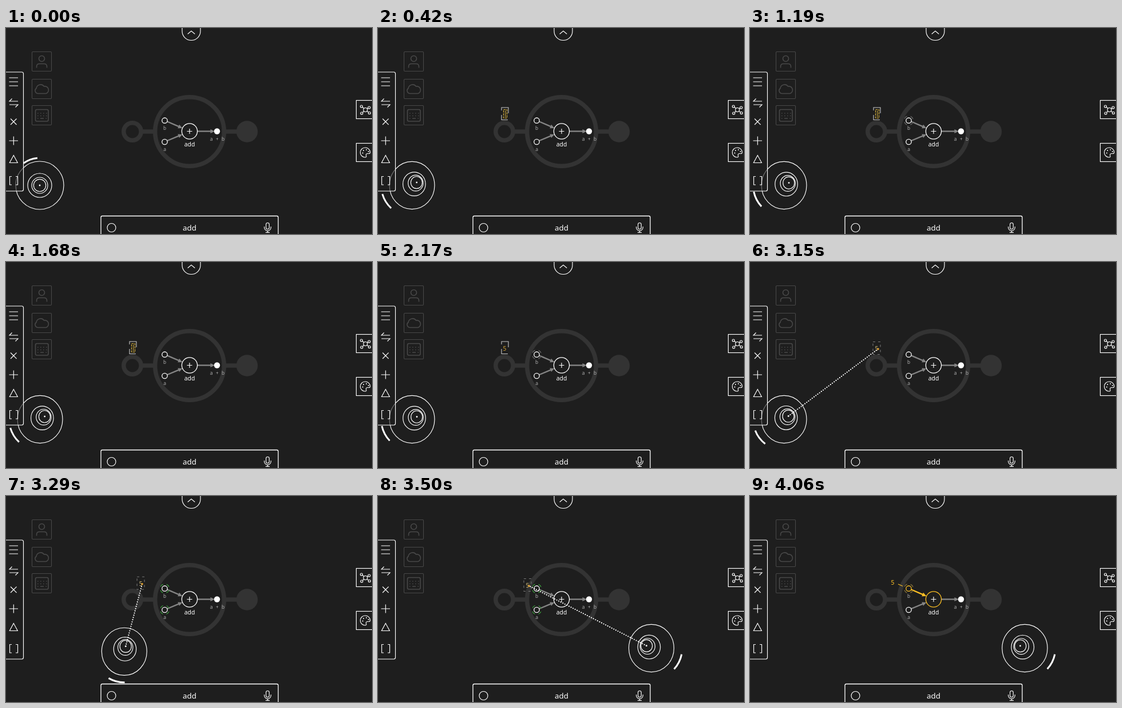
An HTML page that plays this animation: 640 px wide and 360 px high, repeating every 4130 ms.

```html
<!DOCTYPE html>
<html lang="en">
<head>
<meta charset="utf-8">
<title>Add node</title>
<style>
html, body { margin: 0; width: 100%; height: 100%; overflow: hidden; background: #1e1e1e; }
svg { display: block; width: 100vw; height: 100vh; }
text { font-family: "Noto Sans", sans-serif; text-anchor: middle; fill: #fff; }
.mono { font-family: "Noto Sans Mono", monospace; font-size: 8.6px; fill: #aaa; }
.line { fill: none; stroke: #fff; stroke-width: 1.15; }
.dim { fill: none; stroke: #484848; stroke-width: 1.1; }
.node { fill: #1e1e1e; stroke: #fff; stroke-width: 1.3; }
.wire { stroke: #858585; fill: #858585; stroke-width: 2.4; }
.wire path { stroke: none; }
.ring { fill: none; stroke-width: 1.2; stroke-dasharray: 6.5 6.07; }
.hot.node, .hot.wire { stroke: #fbbf24; }
.hot.wire { fill: #fbbf24; }
</style>
</head>
<body>
<svg viewBox="0 0 640 360">
  <rect width="640" height="360" fill="#1e1e1e"/>

  <g fill="none" stroke="#333" stroke-width="7.5">
    <circle cx="321" cy="181" r="60.3"/>
    <circle cx="221" cy="181" r="15.2"/>
    <path d="M239 181H258M384 181H404"/>
    <circle cx="421.5" cy="181" r="18.7" fill="#333" stroke="none"/>
  </g>

  <g class="dim">
    <rect x="45.5" y="41.5" width="34" height="34" rx="1.5"/>
    <rect x="45.5" y="89.5" width="34" height="34" rx="1.5"/>
    <rect x="45.5" y="135.5" width="34" height="34" rx="1.5"/>
    <g stroke-width="1.6">
      <circle cx="62.5" cy="53.5" r="5"/>
      <path d="M53.5 69.5v-2q0-5 5-5h8q5 0 5 5v2"/>
      <path d="M56 114.5a5 5 0 0 1-3-9a7.5 7.5 0 0 1 13.5-3.5a6.5 6.5 0 0 1 3.5 12.5z"/>
      <rect x="51.5" y="142.5" width="22.5" height="20.5" rx="2.5"/>
      <path d="M55 149H72M55 153.5H72" stroke-dasharray="1.5 3.5"/>
      <path d="M55 158h1.5M60 158h6M69.5 158h1.5"/>
    </g>
  </g>

  <g class="line">
    <path d="M308 -2V5.5a16 16 0 0 0 32 0V-2M317.700 10.500L324 5.300L330.300 10.500"/>

    <rect x="612.500" y="126.500" width="40" height="32"/>
    <rect x="612.500" y="201.500" width="40" height="32"/>
    <circle cx="628.500" cy="143" r="3.500"/>
    <circle cx="621.500" cy="137" r="2"/>
    <circle cx="635" cy="139" r="2"/>
    <circle cx="622" cy="149" r="2"/>
    <circle cx="635.500" cy="148.500" r="2"/>
    <path d="M623 138.300L626 140.500M633.200 140L631.500 141.200M623.500 147.500L626 145.500M634 147.200L631 145.300"/>
    <path d="M628 209a8.500 8.500 0 1 0 0 17c2 0 2.500-1.500 1.800-3c-.8-2 .2-3.500 2.500-3.500h2.500c1.500 0 2-1 2-2.500c0-4.500-4-8-8.800-8z"/>
    <path d="M623 218.500h1.500M624.500 214h1.500M629.500 212.800h1.500M633 216h1.500" stroke-width="2"/>

    <path d="M166 362V331q0-2.500 2.500-2.500H473.500q2.500 0 2.500 2.500V362" stroke-width="1.300"/>
    <circle cx="184.500" cy="349" r="7.500"/>
    <rect x="454.700" y="340.500" width="5.600" height="11" rx="2.800"/>
    <path d="M451.700 347v1.500a5.800 5.800 0 0 0 11.600 0v-1.500M457.500 354.300v3M454 357.300h7"/>
  </g>
  <text x="321" y="353.700" font-size="13.400">add</text>

  <g class="wire" id="wireB"><line x1="282" y1="163.500" x2="302" y2="172.200"/><path d="M308.500 175L300.300 175.300L303 168.800Z"/></g>
  <g class="wire"><line x1="282" y1="197" x2="302" y2="188.600"/><path d="M308.500 186L303 192L300.300 185.500Z"/></g>
  <g class="wire"><line x1="335" y1="180.500" x2="358" y2="180.500"/><path d="M365 180.500L357.500 184V177Z"/></g>
  <circle class="node" id="nodeB" cx="277.500" cy="161.700" r="4.700"/>
  <circle class="node" cx="277.500" cy="199" r="4.700"/>
  <circle class="node" id="nodeAdd" cx="321" cy="180.500" r="13.600"/>
  <path class="line" d="M316.500 180.500H325.500M321 176V185"/>
  <circle cx="369" cy="180.500" r="5.200" fill="#fff"/>
  <text class="mono" x="277.500" y="178">b</text>
  <text class="mono" x="277.500" y="215">a</text>
  <text class="mono" x="369.300" y="196.500" xml:space="preserve">a + b</text>
  <text x="321" y="206.700" font-size="10.400">add</text>
  <circle class="ring" id="ringB" cx="277.500" cy="161.700" r="8" transform="rotate(22 277.500 161.700)"/>
  <circle class="ring" id="ringA" cx="277.500" cy="199" r="8" transform="rotate(22 277.500 199)" stroke="#3a9a3a"/>

  <g id="field" fill="none">
    <path id="corners" stroke="#c8c8c8" stroke-width="1.100"/>
    <rect id="slot" x="219.500" y="142.500" width="6" height="15" stroke="#d9b33c" stroke-width="1.100" stroke-dasharray="4 1.250"/>
    <path id="caret" d="M222.700 144V156" stroke="#d9b33c"/>
  </g>
  <g id="value">
    <rect id="grab" x="-6.500" y="-11.500" width="13" height="22" fill="none" stroke="#777" stroke-width="1.100" stroke-dasharray="4 5"/>
    <text id="five" class="mono" y="4" style="font-size:10.700px">5</text>
  </g>
  <path id="link" d="M259 154L267 157.500" stroke="#fbbf24" stroke-width="1.200"/>

  <line id="rope" stroke="#fff" stroke-width="2.200" stroke-linecap="round" stroke-dasharray="0 4"/>
  <circle id="tip" r="1.800" fill="#e0a030"/>
  <g id="pad" class="line"></g>

  <g class="line">
    <rect x="-6" y="77" width="36.500" height="208" rx="3" fill="#1e1e1e" fill-opacity=".6"/>
    <path d="M5.500 87H21M5.500 94H21M5.500 101H21"/>
    <path d="M10.500 123.500L6 128H21M6 134H21L16.500 138.500"/>
    <path d="M8 158.500L18.500 169M18.500 158.500L8 169"/>
    <path d="M5.500 197H21M13.300 189.500V204.500"/>
    <path d="M13.300 222.500L20.300 235.500H6.300Z"/>
    <path d="M10 259.500H6.500V274H10M17 259.500H20.500V274H17"/>
  </g>
</svg>
<script>
const LOOP = 4130, STEP = 70;
const $ = id => document.getElementById(id);
const set = (id, attrs) => { for (const k in attrs) $(id).setAttribute(k, attrs[k]); };
const show = (id, on) => { $(id).style.display = on ? "" : "none"; };

// Keys are [time, value, value, ...]; values ease between neighbours.
function track(keys, t) {
  let i = 0;
  while (i < keys.length - 1 && keys[i + 1][0] <= t) i++;
  const a = keys[i], b = keys[i + 1] || a;
  const u = a === b ? 0 : Math.max(0, (t - a[0]) / (b[0] - a[0]));
  const s = u * u * (3 - 2 * u);
  return a.slice(1).map((v, j) => v + (b[j + 1] - v) * s);
}

const AIM = [[0, 60.5, 279], [210, 222, 152], [280, 222, 152], [560, 277, 162], [1330, 277, 162],
  [1680, 245, 161], [1890, 255, 161], [2170, 272, 162], [2520, 237, 160], [3010, 224, 152],
  [3150, 224, 152], [3500, 264, 157], [3570, 266, 158], [3920, 277, 162]];
const PAD = [[0, 59, 275, 0], [210, 59.5, 275, 1], [3150, 59.5, 275, 1],
  [3500, 478, 266, 1], [3570, 479, 266, 1], [3920, 480.5, 266, 0.93]];
const DROP = [[3570, 263.5, 157], [3920, 249.5, 150.5]];
const RINGS = [[42, 0], [21, 4.5], [14, 7.5], [10.7, 9.3]];

function drawPad(x, y, tilt, angle) {
  const c = Math.cos(angle) * tilt, s = Math.sin(angle) * tilt;
  const rings = RINGS.map(([R, d]) =>
    `<ellipse cx="${d * c}" cy="${d * s}" rx="${R * (1 - 0.06 * tilt)}" ry="${R * (1 - 0.01 * tilt)}"/>`).join("");
  const r = 48 + 6 * tilt, half = 15.6 * Math.PI / 180;
  const px = -r * Math.cos(half), py = r * Math.sin(half);
  $("pad").innerHTML = rings +
    `<circle cx="${9.6 * c}" cy="${9.6 * s}" r="1.4" fill="#fff" stroke="none"/>` +
    `<path d="M${px} ${py}A${r} ${r} 0 0 1 ${px} ${-py}" stroke-width="3" transform="rotate(${angle * 180 / Math.PI})"/>`;
  set("pad", { transform: `translate(${x} ${y})` });
}

function draw(t) {
  const [ax, ay] = track(AIM, t), [x, y, tilt] = track(PAD, t);
  const angle = Math.atan2(ay - y, ax - x);
  drawPad(x, y, tilt, angle);

  const drag = t >= 3080 && t < 3640, linked = t >= 3640;
  const green = t >= 3220 && drag;
  const editing = t >= 70 && t < 2450, typed = t >= 1890, hover = t >= 2870 && !linked;

  show("field", editing);
  const w = track([[70, 30], [210, 6]], t)[0], l = 222 - w, r = 222 + w;
  set("corners", { d: `M${l} 144V139H${r}V149M${l} 152V160.5H${r - 1}` });
  show("slot", !typed);
  show("caret", !typed && (t < 700 || t >= 1190));

  const [vx, vy] = linked ? track(DROP, t) : drag ? [ax - 2.5, ay - 1] : [221.5, 150.5];
  show("value", typed);
  set("value", { transform: `translate(${vx} ${vy})` });
  $("five").style.fill = linked ? "#fbbf24" : hover ? "#cbb878" : "#cfa033";
  show("grab", hover);
  show("link", t >= 3780);

  show("rope", drag);
  show("tip", drag);
  set("rope", { x1: x + 9.6 * Math.cos(angle), y1: y + 9.6 * Math.sin(angle), x2: ax, y2: ay });
  set("tip", { cx: ax, cy: ay });

  const near = t < 3010 && Math.hypot(ax - 277, ay - 162) < 14;
  show("ringA", green);
  show("ringB", green || linked || near);
  set("ringB", { stroke: green ? "#3a9a3a" : linked ? "#85713c" : "#666" });
  for (const id of ["wireB", "nodeB", "nodeAdd"]) $(id).classList.toggle("hot", linked);
}

const start = performance.now();
function tick() {
  const t = (performance.now() - start) % LOOP;
  draw(Math.floor(t / STEP) * STEP);
  requestAnimationFrame(tick);
}
tick();
</script>
</body>
</html>
```
